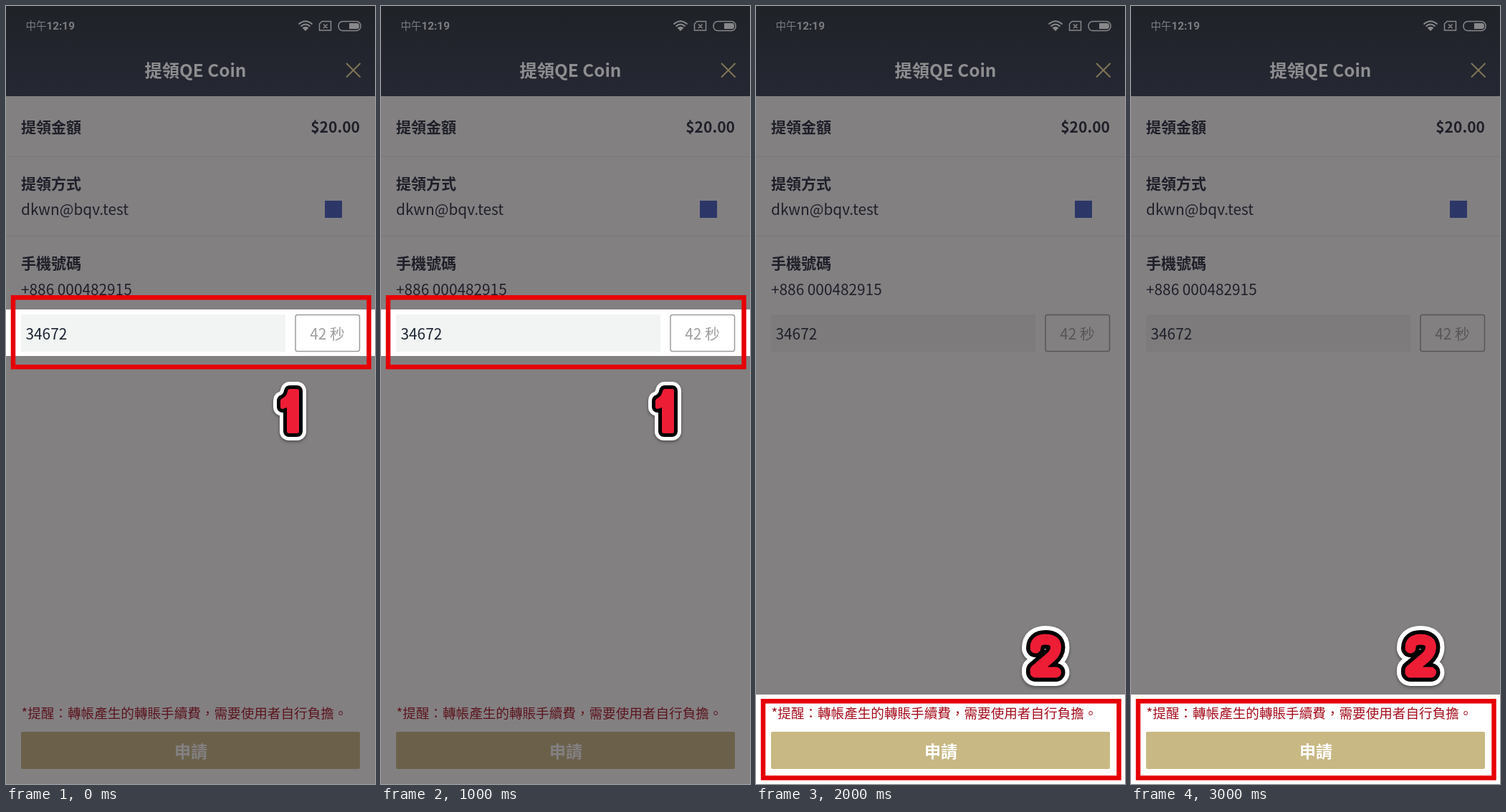
These frames come from a looping animation (515 px wide and 1087 px high, 3100 ms). An HTML page:

```html
<!DOCTYPE html>
<html lang="zh-Hant">
<head>
<meta charset="utf-8">
<title>提領</title>
<style>
  html, body { margin: 0; width: 100%; height: 100%; overflow: hidden; background: #838082; }
  svg { display: block; width: 515px; height: 1087px; }
  text { font: 20.8px "Noto Sans CJK TC", "Noto Sans CJK JP", "Noto Sans", sans-serif; fill: #1b2333; }
  .label { font-size: 21px; font-weight: 700; }
  .end { text-anchor: end; }
  .mid { text-anchor: middle; }
  .note { font-size: 18.6px; fill: #a50d1c; }
  .apply { font-size: 23px; font-weight: 700; fill: #fff; }
  .muted { fill: #9d9d9d; }
  .title { font-size: 24.3px; font-weight: 700; fill: #8e8d90; }
  .clock { font-size: 14.5px; font-weight: 500; fill: #7c7c80; }
  .clock tspan { font: 700 15.3px Roboto, sans-serif; }
  .veil { fill: #221e20; fill-opacity: .56; }
  .frame { fill: none; stroke: #e60005; stroke-width: 6.5; }
  .sticker { filter: drop-shadow(0 2px 2px rgba(0, 0, 0, .4)); stroke-linejoin: round; stroke-linecap: round; }
  .icon { fill: none; stroke: #88888b; stroke-width: 1.5; }
  .icon .solid { fill: #88888b; stroke: none; }
</style>
</head>
<body>
<svg viewBox="0 0 515 1087">
  <defs>
    <linearGradient id="bar" x2="0" y2="1">
      <stop offset="0" stop-color="#1f2227"/>
      <stop offset="1" stop-color="#252833"/>
    </linearGradient>
    <path id="one" d="M396 535H406Q409 535 409 538V594Q409 597 406 597H395Q392 597 392 594V561L386 563Q383 563 383 560V552Q383 549 386 548Q392 545 393 538Q394 535 396 535Z"/>
    <path id="two" d="M390 897Q390 885 404 885Q418.500 885 418.500 896Q418.500 904 410 911L390 928V931H418.500"/>
  </defs>

  <!-- page -->
  <rect width="515" height="1087" fill="#fff"/>
  <path d="M0 210.5H515M0 321.5H515" stroke="#e9e9ec"/>
  <text class="label" x="21" y="176.5">提領金額</text>
  <text class="label end" x="494" y="176.5">$20.00</text>
  <text class="label" x="21" y="256">提領方式</text>
  <text x="21" y="292">dkwn@bqv.test</text>
  <text class="label" x="21" y="367">手機號碼</text>
  <text x="21" y="404">+886 000482915</text>
  <rect x="21" y="431" width="369" height="52" fill="#f1f4f2"/>
  <text x="27.5" y="465.5">34672</text>
  <rect x="404" y="431.5" width="89.5" height="51" rx="3" fill="#fff" stroke="#9d9d9d" stroke-width="1.5"/>
  <text class="muted mid" x="448.5" y="465.5">42 秒</text>
  <text class="note" x="21.5" y="995">*提醒：轉帳產生的轉賬手續費，需要使用者自行負擔。</text>
  <rect x="21" y="1014" width="473" height="52" rx="2" fill="#c8b883"/>
  <text class="apply mid" x="258" y="1049.5">申請</text>

  <!-- spotlights -->
  <g id="code">
    <path class="veil" d="M0 0H515V424H0ZM0 489H515V1087H0Z"/>
    <rect class="frame" x="10" y="407.3" width="496.5" height="97"/>
    <g class="sticker">
      <use href="#one" fill="#fff" stroke="#fff" stroke-width="20"/>
      <use href="#one" stroke="#000" stroke-width="10"/>
      <use href="#one" fill="#ee1d36"/>
    </g>
  </g>
  <g id="submit" opacity="0">
    <path class="veil" d="M0 0H515V962H0Z"/>
    <rect class="frame" x="10" y="971.3" width="496.5" height="107.2"/>
    <g class="sticker" fill="none">
      <use href="#two" stroke="#fff" stroke-width="38"/>
      <use href="#two" stroke="#000" stroke-width="26"/>
      <use href="#two" stroke="#ee1d36" stroke-width="15"/>
    </g>
  </g>

  <!-- header -->
  <rect width="515" height="126" fill="url(#bar)"/>
  <text class="clock" x="27.5" y="33">中午<tspan>12:19</tspan></text>
  <g class="icon">
    <path stroke-width="2" d="M408.5 25.5Q418 17 427.5 25.5M411.5 28.5Q418 22.5 424.5 28.5"/>
    <path class="solid" d="M413.5 30.5Q418 27 422.5 30.5L418 35Z"/>
    <path d="M441 21.5H453.5V34H437.5V25ZM443 25.5L448.5 31M448.5 25.5L443 31"/>
    <rect x="464" y="21.5" width="31" height="13" rx="6"/>
    <path class="solid" d="M479 24H490Q493 24 493 28T490 32H479Z"/>
  </g>
  <text class="title" x="193.5" y="98.5">提領QE Coin</text>
  <path d="M475 80L494.5 99.5M494.5 80L475 99.5" stroke="#7f7556" stroke-width="2"/>
  <rect x="445" y="272" width="24" height="24" fill="#2c3768"/>
</svg>
<script>
  const LOOP = 3100, CUT = 1500;

  // Hard switch between the two spotlights.
  function show(id, before, after) {
    document.getElementById(id).animate([
      { opacity: before, offset: 0, easing: 'step-end' },
      { opacity: after, offset: CUT / LOOP, easing: 'step-end' },
      { opacity: after, offset: 1 }
    ], { duration: LOOP, iterations: Infinity });
  }
  show('code', 1, 0);
  show('submit', 0, 1);
</script>
</body>
</html>
```
